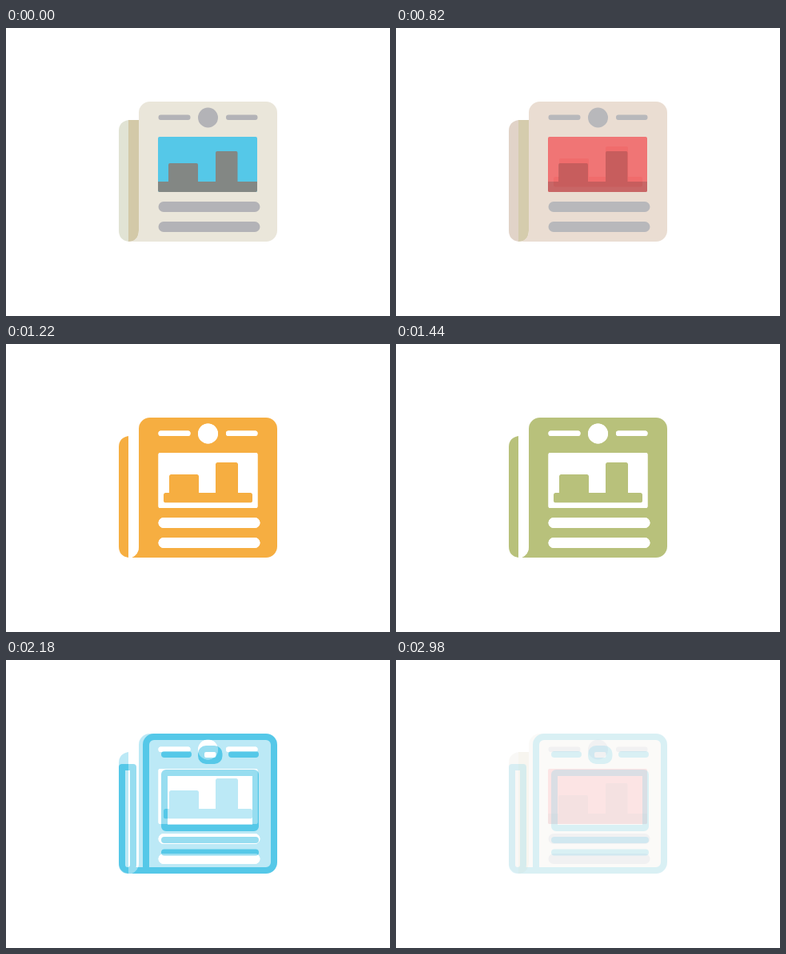
An HTML page that plays this animation: 480x360 px, repeating every 3 s.

```html
<!DOCTYPE html>
<html>
<head>
<meta charset="utf-8">
<style>
html, body { margin: 0; width: 100%; height: 100%; overflow: hidden; background: #fff }
svg { display: block; width: 100vw; height: 100vh }
</style>
</head>
<body>
<svg viewBox="0 0 480 360">
  <g id="flat">
    <path fill="#d3c9a8" d="M153 115h13V253q0 14-13 14z"/>
    <path id="tab" d="M153 115V267q-12-2-12-14V129q0-12 12-14z"/>
    <path id="page" fill="#eae6da" d="M180 92H325a14 14 0 0 1 14 14V253a14 14 0 0 1-14 14H157q9-4 9-14V106a14 14 0 0 1 14-14z"/>
    <path id="marks" fill="#b3b3b7"/>
    <rect id="sky" x="190" y="136" width="124" height="69" rx="2"/>
    <path id="city" d="M190 192H203V171q0-2 2-2h33q2 0 2 2V192h22V156q0-2 2-2h23.500q2 0 2 2V192H314v11q0 2-2 2H192q-2 0-2-2z"/>
  </g>
  <g id="glyph">
    <rect width="480" height="360" fill="#fff"/>
    <path id="solid" fill-rule="evenodd"/>
  </g>
  <path id="holes" fill="#fff" fill-rule="evenodd"/>
  <g id="outline">
    <rect id="backing" width="480" height="360" fill="#fff"/>
    <g fill="none" stroke="#55c8e8" stroke-width="8" stroke-linecap="round" stroke-linejoin="round">
      <path d="M175 263H152a7 7 0 0 1-7-7V134H159V256a7 7 0 0 1-7 7M198 118h30M282 118h30M198 225H312M198 240.500H312M185 96H325a10 10 0 0 1 10 10V253a10 10 0 0 1-10 10H175V106a10 10 0 0 1 10-10z"/>
      <rect x="244" y="111" width="22.500" height="15" rx="6"/>
      <rect x="198" y="141" width="114" height="69" rx="2"/>
    </g>
  </g>
</svg>
<script>
const LOOP = 3000, FADE = 330;
const BLUE = [85, 200, 232], RED = [240, 108, 108], YELLOW = [247, 181, 60], TEAL = [122, 204, 186];
const $ = id => document.getElementById(id);
const ramp = (t, from, to) => Math.min(1, Math.max(0, (t - from) / (to - from)));
const mix = (a, b, p) => a.map((v, i) => v + (b[i] - v) * p);
const rgb = c => `rgb(${c.map(Math.round)})`;
const show = (id, alpha) => $(id).setAttribute('opacity', alpha);
const fill = (id, c) => $(id).setAttribute('fill', rgb(c));

const box = (x, y, w, h, r) =>
  `M${x + r} ${y}h${w - 2 * r}a${r} ${r} 0 0 1 ${r} ${r}v${h - 2 * r}a${r} ${r} 0 0 1 ${-r} ${r}` +
  `h${2 * r - w}a${r} ${r} 0 0 1 ${-r} ${-r}v${2 * r - h}a${r} ${r} 0 0 1 ${r} ${-r}z`;

const marks = box(190.5, 108.5, 40, 6.5, 3) + box(275, 108.5, 39.5, 6.5, 3) +
  box(240, 99.5, 25, 25, 12.5) + box(190.5, 217, 127, 13, 6.5) + box(190.5, 242, 127, 13, 6.5);
const picture = box(190.5, 136, 124, 69, 2) +
  'M199 186h5V165q0-2 2-2h33q2 0 2 2V186h21V150q0-2 2-2h24q2 0 2 2V186h16q2 0 2 2v8.500q0 2-2 2H199q-2 0-2-2V188q0-2 2-2z';
const cutouts = marks + picture;
$('marks').setAttribute('d', marks);
$('holes').setAttribute('d', cutouts + 'M153 115h13V253q0 10-9 14h-4z');
$('solid').setAttribute('d', $('page').getAttribute('d') + $('tab').getAttribute('d') + cutouts);

const tints = [[1040, RED], [1240, YELLOW], [1640, TEAL], [1840, TEAL], [2000, BLUE]];
function tint(t) {
  let c = RED;
  for (let i = 1; i < tints.length; i++)
    c = mix(c, tints[i][1], ramp(t, tints[i - 1][0], tints[i][0]));
  return c;
}

function draw(now) {
  const t = now % LOOP;
  const warm = ramp(t, 0, 800);
  const toGlyph = ramp(t, 800, 800 + FADE);
  const toOutline = ramp(t, 1980, 1980 + FADE);
  const leave = ramp(t, 2780, 3030);
  const ending = t >= 2780;

  fill('sky', mix(BLUE, RED, warm));
  fill('city', mix([131, 135, 132], [197, 92, 92], warm));
  fill('tab', mix([225, 227, 212], [225, 219, 207], warm));
  fill('solid', tint(t));

  show('flat', ending ? leave ** 8 : 1);
  show('glyph', ending ? 0 : toGlyph);
  show('holes', ending ? 0 : ramp(toGlyph, 0.2, 0.55));
  show('outline', ending ? 1 - leave : toOutline);
  show('backing', ending ? 0 : 1);
  requestAnimationFrame(() => draw(performance.now() - start));
}
const start = performance.now();
draw(0);
</script>
</body>
</html>
```
